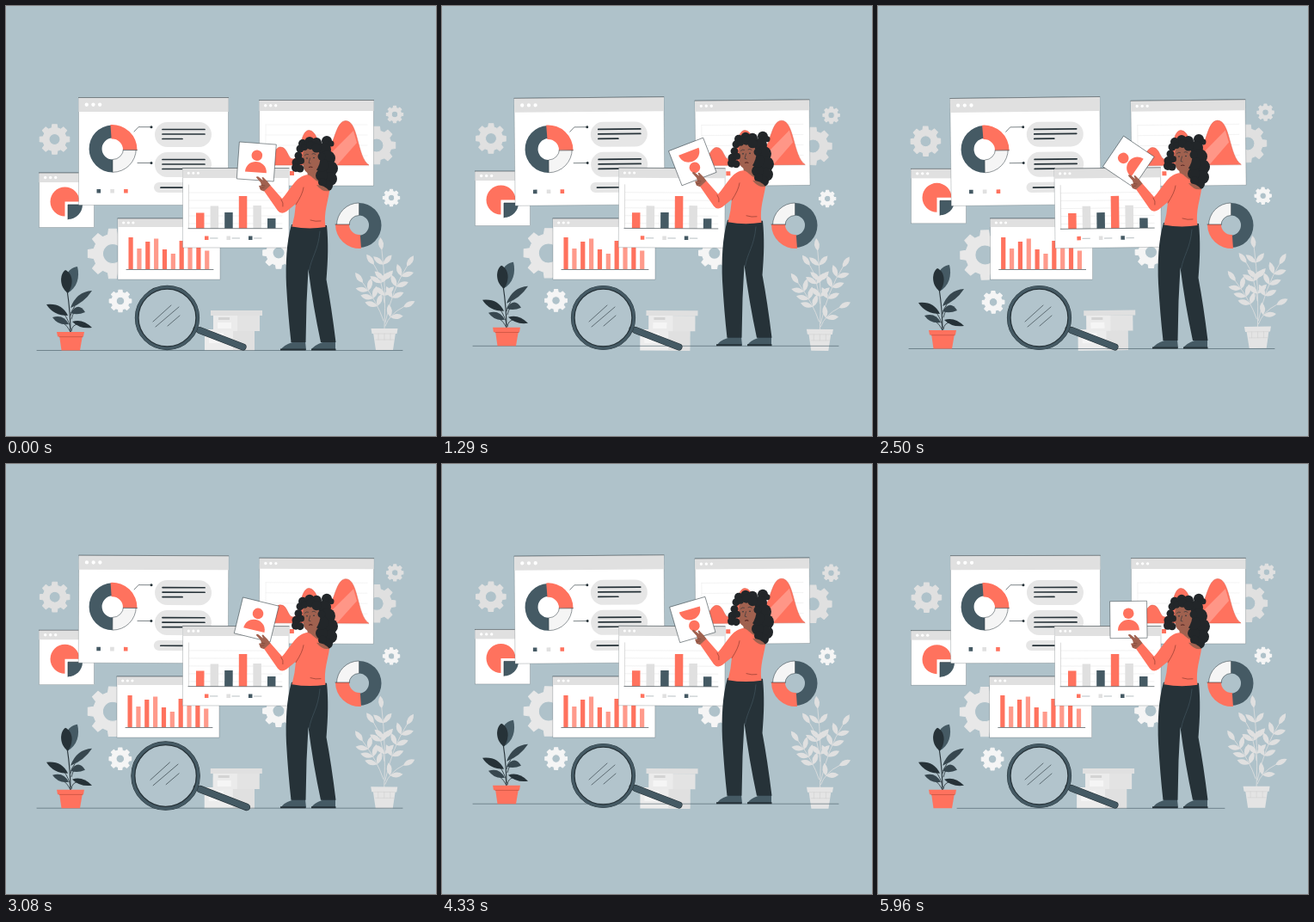
Animation, 500 px wide and 500 px high, one loop 6000 ms. Source, as an HTML page:

```html
<!DOCTYPE html>
<html lang="en">
<head>
<meta charset="utf-8">
<title>Data analysis</title>
<style>
html, body { margin: 0; width: 100%; height: 100%; overflow: hidden; background: #afc2ca; }
svg { display: block; width: 100vw; height: 100vh; }
</style>
</head>
<body>
<svg id="stage" viewBox="0 0 500 500"></svg>
<script>
const CORAL = '#ff725e', NAVY = '#455a64', DARK = '#263238', GREY = '#e0e0e0', PALE = '#f5f5f5',
      SKIN = '#a0614f', HAIR = '#222629';
const LOOP = 6000;

// ---- drawing helpers ----
const rect = (x, y, w, h, fill, more = '') => `<rect x="${x}" y="${y}" width="${w}" height="${h}" fill="${fill}" ${more}/>`;
const circle = (x, y, r, fill, more = '') => `<circle cx="${x}" cy="${y}" r="${r}" fill="${fill}" ${more}/>`;
const path = (d, fill, more = '') => `<path d="${d}" fill="${fill}" ${more}/>`;
const line = (d, color = DARK, w = .6) => path(d, 'none', `stroke="${color}" stroke-width="${w}" stroke-linecap="round" stroke-linejoin="round"`);
const group = (id, ...parts) => `<g id="${id}">${parts.join('')}</g>`;
const polar = (x, y, r, deg) => {
  const a = deg * Math.PI / 180;
  return `${(x + r * Math.cos(a)).toFixed(2)} ${(y + r * Math.sin(a)).toFixed(2)}`;
};

function sector(x, y, r, hole, from, to, fill, more = '') {
  const big = to - from > 180 ? 1 : 0;
  const inner = hole ? `L${polar(x, y, hole, to)}A${hole} ${hole} 0 ${big} 0 ${polar(x, y, hole, from)}` : `L${x} ${y}`;
  return path(`M${polar(x, y, r, from)}A${r} ${r} 0 ${big} 1 ${polar(x, y, r, to)}${inner}Z`, fill, more);
}

function gear(x, y, r, hole, fill) {
  let d = '';
  for (let a = 0; a < 360; a += 45)
    [[-14, .78], [-9, 1], [9, 1], [14, .78]].forEach(([da, k]) => d += (d ? 'L' : 'M') + polar(x, y, r * k, a + da));
  d += `ZM${x - hole} ${y}a${hole} ${hole} 0 1 0 ${2 * hole} 0a${hole} ${hole} 0 1 0 ${-2 * hole} 0Z`;
  return path(d, fill, `fill-rule="evenodd" stroke="${fill}" stroke-width="1" stroke-linejoin="round"`);
}

function leaf(x, y, tx, ty, w, fill) {
  const mx = (x + tx) / 2, my = (y + ty) / 2, len = Math.hypot(tx - x, ty - y);
  const nx = -(ty - y) / len * w, ny = (tx - x) / len * w;
  return path(`M${x} ${y}Q${mx + nx} ${my + ny} ${tx} ${ty}Q${mx - nx} ${my - ny} ${x} ${y}Z`, fill);
}

function panel(x, y, w, h, bar, dots) {
  let s = rect(x, y, w, h, '#fff', `stroke="${DARK}" stroke-width=".5" stroke-opacity=".45"`) + rect(x, y, w, bar, GREY);
  for (let i = 0; i < 3; i++) s += circle(x + dots * (1.2 + i), y + bar / 2, dots * .28, '#fff');
  return s + line(`M${x} ${y}H${x + w}`, DARK, .5);
}

// ---- scenery ----
function palePlant() {
  const branches = [
    [440, 376, 442, 325, 437, 284, 3], [441, 368, 449, 330, 466, 303, 3], [439, 366, 432, 345, 415, 322, 3],
    [440, 345, 436, 312, 428, 301, 1], [441, 372, 446, 358, 462, 350, 1]
  ];
  let s = '';
  for (const [x0, y0, cx, cy, x1, y1, n] of branches) {
    s += line(`M${x0} ${y0}Q${cx} ${cy} ${x1} ${y1}`, GREY, .8);
    for (let i = 0; i <= n; i++) {
      const t = .4 + .6 * i / n, u = 1 - t;
      const x = u * u * x0 + 2 * u * t * cx + t * t * x1, y = u * u * y0 + 2 * u * t * cy + t * t * y1;
      const a = Math.atan2(u * (cy - y0) + t * (y1 - cy), u * (cx - x0) + t * (x1 - cx));
      for (const side of i === n ? [0] : [-.8, .8])
        s += leaf(x, y, x + 15 * Math.cos(a + side), y + 15 * Math.sin(a + side), 6, GREY);
    }
  }
  return s + path('M427 380H453L450 400H430Z', '#e4e4e4') + path('M424.500 375H455.500L454.500 381H425.500Z', '#e4e4e4')
    + line('M428 381H452M430 388H451M433 381V388M440 381V388M447 381V388', '#d0d0d0', .6);
}

const boxes = () =>
  rect(231, 376, 58, 24.500, '#ececec') + rect(264, 376, 25, 24.500, GREY) + rect(236, 380, 17, 12, PALE)
  + rect(241, 360, 54, 18, '#e3e3e3') + rect(241, 360, 28, 18, '#ebebeb') + rect(238, 354, 60, 6, GREY)
  + rect(247, 362, 13, 3, '#d3d3d3') + rect(246, 368, 16, 7, PALE);

const darkPlant = () =>
  line('M75 380C75 362 74 350 71 330', DARK, 1.1)
  + line('M75 360Q76 354 80 349M75 376Q74 366 66 356M76 364Q77 359 80 355M75 379Q72 372 66 368M76 378Q77 370 84 370', DARK, .8)
  + path('M71 334C66 318 70 305 83 303C86 315 83 328 71 334Z', NAVY)
  + path('M72 334C62 327 62 312 69 307C78 311 79 324 72 334Z', DARK)
  + path('M75 351Q82 332 100 331Q91 345 75 351Z', '#37474f') + path('M72 360Q55 360 47 347Q65 345 72 360Z', DARK)
  + path('M75 357Q84 343 92 356Q83 360 75 357Z', '#37474f') + path('M73 370Q61 372 54 362Q67 358 73 370Z', '#37474f')
  + path('M77 367Q89 363 100 374Q86 376 77 367Z', DARK)
  + path('M62 383H89L86 400.500H64.500Z', CORAL) + path('M59 379H91L90 384.500H60Z', CORAL)
  + line('M62 384.700H89', '#b5493a', .6);

// ---- windows ----
function mainPanel() {
  let s = panel(84.500, 106.500, 174, 125, 16.500, 7.700)
    + sector(124, 166, 27.500, 12.500, 90, 268, NAVY)
    + sector(124, 166, 27.300, 12.500, 0, 90, PALE, `stroke="${DARK}" stroke-width=".5"`)
    + sector(123.500, 167, 29, 12.500, -94, 1, CORAL) + line('M136.500 167.600H152.500', DARK, .6)
    + line('M149 146L154 140.700H168M153 182.500H168') + circle(169, 140.700, 1.500, DARK) + circle(169, 182.500, 1.500, DARK);
  for (const y of [135, 170])
    s += rect(173, y, 66, 29, '#e6e6e6', 'rx="14.500"') + line(`M182 ${y + 8.500}H231M182 ${y + 14}H231M182 ${y + 19.500}H205`, DARK, 1.700);
  s += rect(172, 205, 67, 12, '#e6e6e6', 'rx="6"') + line('M180 211.200H215', DARK, 1.700);
  [NAVY, GREY, CORAL].forEach((c, i) => s += rect(105.500 + i * 15.800, 213, 4.600, 4.600, c));
  return s;
}

const curvePanel = () =>
  panel(294.500, 109.500, 133, 99.500, 12.500, 6)
  + line('M302 138V186H422M302 138H420M302 150H420M302 162H420M302 174H420', '#ececec', .6)
  + path('M302 185C311 172 314 164 319 164C328 164 327 178 334 178C342 178 342 144.500 352 144.500C363 144.500 363 168 371 168C382 168 382 133.500 395 133.500C410 133.500 408 176 422 185Z', CORAL, `stroke="#d95a48" stroke-width=".5"`)
  + path('M404 145L373 176L378 185H385L408 159Z', '#fff', 'opacity=".25"')
  + rect(330, 192, 5, 5, CORAL);

const piePanel = () =>
  panel(38.500, 194, 64, 63.500, 11, 6)
  + sector(68.500, 227.500, 17, 0, 90, 360, CORAL)
  + sector(72, 231, 17, 0, 0, 90, NAVY) + line('M72 248V231H89', DARK, .6);

function barPanel() {
  let s = panel(130, 247, 119, 71, 10, 5.600);
  [37, 24, 32, 35.500, 23, 18, 33, 28, 30, 21.500].forEach((h, i) =>
    s += rect(142.500 + i * 9.850, 306 - h, 5.200, h, i % 2 ? '#ff9a8b' : CORAL));
  return s + line('M140 306.500H241', DARK, .6);
}

function frontPanel() {
  let s = panel(205.500, 188.500, 123.500, 92.500, 11.500, 5.600);
  for (let y = 217; y < 258; y += 9) s += line(`M213 ${y}H321`, '#e3e3e3', .5);
  s += line('M212.500 208V258', '#c4c4c4', .6);
  [18, 26, 18.500, 37.500, 26.500, 11.500].forEach((h, i) =>
    s += rect(221 + i * 16.600, 258.500 - h, 9.500, h, [CORAL, GREY, NAVY][i % 3]));
  s += line('M212 258.700H321', DARK, .6);
  [CORAL, GREY, NAVY].forEach((c, i) => {
    const x = 231 + i * 25.500;
    s += rect(x, 267.500, 4.500, 4.500, c) + line(`M${x + 6.500} 270H${x + 15}`, '#9aa5aa', .7);
  });
  return s;
}

const sideDonut = () =>
  sector(410.500, 255, 26, 11.500, -90, 90, NAVY)
  + sector(410.500, 255, 26, 11.500, 180, 270, PALE, `stroke="${DARK}" stroke-width=".5"`)
  + sector(411, 254, 28, 12, 86, 180, CORAL) + line('M383 254H399', DARK, .6);

const magnifier = () =>
  line('M220 375L228 378', DARK, 5)
  + line('M225 377L275.500 396.500', DARK, 8) + line('M225 377L275.500 396.500', NAVY, 6.800)
  + circle(187.500, 362.500, 35.200, '#fff', `fill-opacity=".04" stroke="${DARK}" stroke-width="4.800"`)
  + circle(187.500, 362.500, 35.600, 'none', `stroke="${NAVY}" stroke-width="3.200"`)
  + line('M171 367L192 348M174 373L201 350M188 372L202 360', DARK, .6);

const card = () =>
  rect(-21.500, -21.500, 43, 43, '#fff', `stroke="${DARK}" stroke-width=".5"`)
  + circle(0, -7.300, 6.300, CORAL)
  + path('M-12.500 12.500C-12 -4 12 -4 12.500 12.500Z', CORAL);

function woman() {
  const backCurls = [[373, 157, 6], [378, 160, 3.500], [370, 167, 8], [374, 177, 9], [377, 189, 9], [377, 201, 8],
    [374, 209, 6], [367, 197, 7], [368, 205, 5], [367, 185, 8]];
  const frontCurls = [[345, 160, 5], [353, 157.500, 5.500], [361, 159, 6], [342, 166, 4.500], [340, 174, 4.500],
    [337.500, 182, 5], [337, 188, 5], [342, 189, 4.500], [343, 180, 4], [347, 164, 4], [354, 162, 5], [361, 165, 5.500], [367, 175, 4.500]];
  const curl = ([x, y, r]) => circle(x, y, r, HAIR);
  return path('M331 390H348L349 400H320Q321 395 333 391Z', NAVY) + path('M366 390H383V400H355Q357 395 368 391Z', NAVY)
    + path('M319 398.500H348.500V400.500H319ZM355 398.500H383.500V400.500H355Z', DARK)
    + path('M332 254C326 275 325 300 326 325Q328 360 331.500 391H348.500L349.500 345L351.500 306Q357 349 366 391H383.500Q378.500 350 372.500 318C374.500 295 375 275 373 255Z', DARK)
    + line('M365 262C363 285 355 292 352.500 308', NAVY, .6)
    + path('M350 188L351 201Q362 209 376 216Q379 207 370 199L364 184Z', SKIN)
    + path('M347 197C354 194 357 202 364 205Q371 209 376 215C375 226 369 240 371.500 257Q352 260 332.500 256.500Q336 244 337 230L326 239Q320 243 316 238L300 215L307 208L321 224C329 216 336 200 347 197Z', CORAL)
    + line('M337 231Q345 219 346 211M320 225Q323 229 322 233M354 249Q360 251 366 250', '#8f3b30', .7)
    + path('M300 215.500L296 214L294 209L297 208.500L296 205L291 199.500Q291 197.500 293.500 198.500L299 203L297.500 199.500Q299 198 300.500 200.500L304 204L307.500 208.500Z', SKIN)
    + line('M297 208.500L301 209M296 212L300 211', '#6d3a2f', .5)
    + backCurls.map(curl).join('') + path('M361 208Q370 208 376 215Q368 217 361 208Z', SKIN)
    + path('M345.500 170Q344 187 348 192Q353 197.500 360 192Q366 184 365.500 174Q362 164 354 164Q347 164 345.500 170Z', SKIN)
    + frontCurls.map(curl).join('')
    + circle(350, 177, .8, DARK) + circle(358, 176.500, .8, DARK)
    + line('M347.500 173.500Q349 171.500 351.500 172.500M356 172Q358 170.500 360 172.500M353.500 177L352 182.500L354 183', DARK, .6)
    + line('M352.500 187.500Q354.500 186.500 356 187.500', '#5a2a26', 1.100);
}

const stage = document.getElementById('stage');
stage.innerHTML =
  group('wind', gear(56.500, 155, 17.500, 6.500, GREY), gear(124, 288, 29, 11.500, '#e8e8e8'), gear(431, 162, 22, 8, GREY),
    gear(317, 287, 18.500, 7, PALE), gear(452, 126, 9.800, 3.700, GREY), gear(448, 223, 9.800, 3.700, PALE),
    gear(133, 343, 13, 4.800, PALE), palePlant(), boxes())
  + group('floor', line('M36 400.500H461', NAVY, .6))
  + group('plant', darkPlant())
  + group('curve', curvePanel()) + group('pie', piePanel()) + group('main', mainPanel())
  + group('bars', barPanel()) + group('front', frontPanel()) + sideDonut()
  + group('lens', magnifier()) + group('card', card()) + group('woman', woman());

// ---- motion ----
const el = id => document.getElementById(id);
const move = (id, value) => el(id).setAttribute('transform', value);
const sway = p => 2 / Math.PI * Math.asin(Math.sin(2 * Math.PI * p));
const lift = p => 1 - Math.abs(2 * p - 1);

function keyed(p, keys, ease = x => x) {
  const i = keys.findIndex(k => k[0] > p);
  const [p0, v0] = keys[i - 1], [p1, v1] = keys[i];
  return v0 + (v1 - v0) * ease((p - p0) / (p1 - p0));
}

const BEAT = [[0, 1], [.1, 1.09], [.3, 1], [.4, 1], [.5, 1.09], [.6, 1], [1, 1]];
const SHAKE = [[0, 0], [.08, -1.500], [.25, -1.500], [.31, 1.200], [.47, 0], [.6, 1.200], [.88, -1.200], [1, 0]];
const easeOut = x => 1 - (1 - x) * (1 - x);

function draw(t) {
  const slow = t % 3000 / 3000, fast = t % 1500 / 1500;
  const rise = `translate(0 ${-6 * lift(slow)})`;
  ['floor', 'plant', 'woman'].forEach(id => move(id, rise));
  move('wind', `rotate(${sway(slow)} 250 250)`);
  move('front', `rotate(${sway(slow)} 267 235)`);
  move('main', `rotate(${sway(fast)} 171 169)`);
  move('curve', `rotate(${sway(fast)} 361 159)`);
  move('pie', `translate(0 ${-7 * lift(fast)})`);
  move('bars', `translate(${keyed(fast, SHAKE)} 0)`);
  move('lens', `translate(214.500 362.500) scale(${keyed(fast, BEAT, easeOut)}) translate(-214.500 -362.500)`);
  move('card', `translate(291.300 181) rotate(${.12 * t + 4})`);
  el('floor').firstChild.setAttribute('d', t < 4650 ? 'M36 400.500H461' : 'M92 400.500H403');
}

function frame() {
  draw(performance.now() % LOOP);
  requestAnimationFrame(frame);
}
frame();
</script>
</body>
</html>
```
